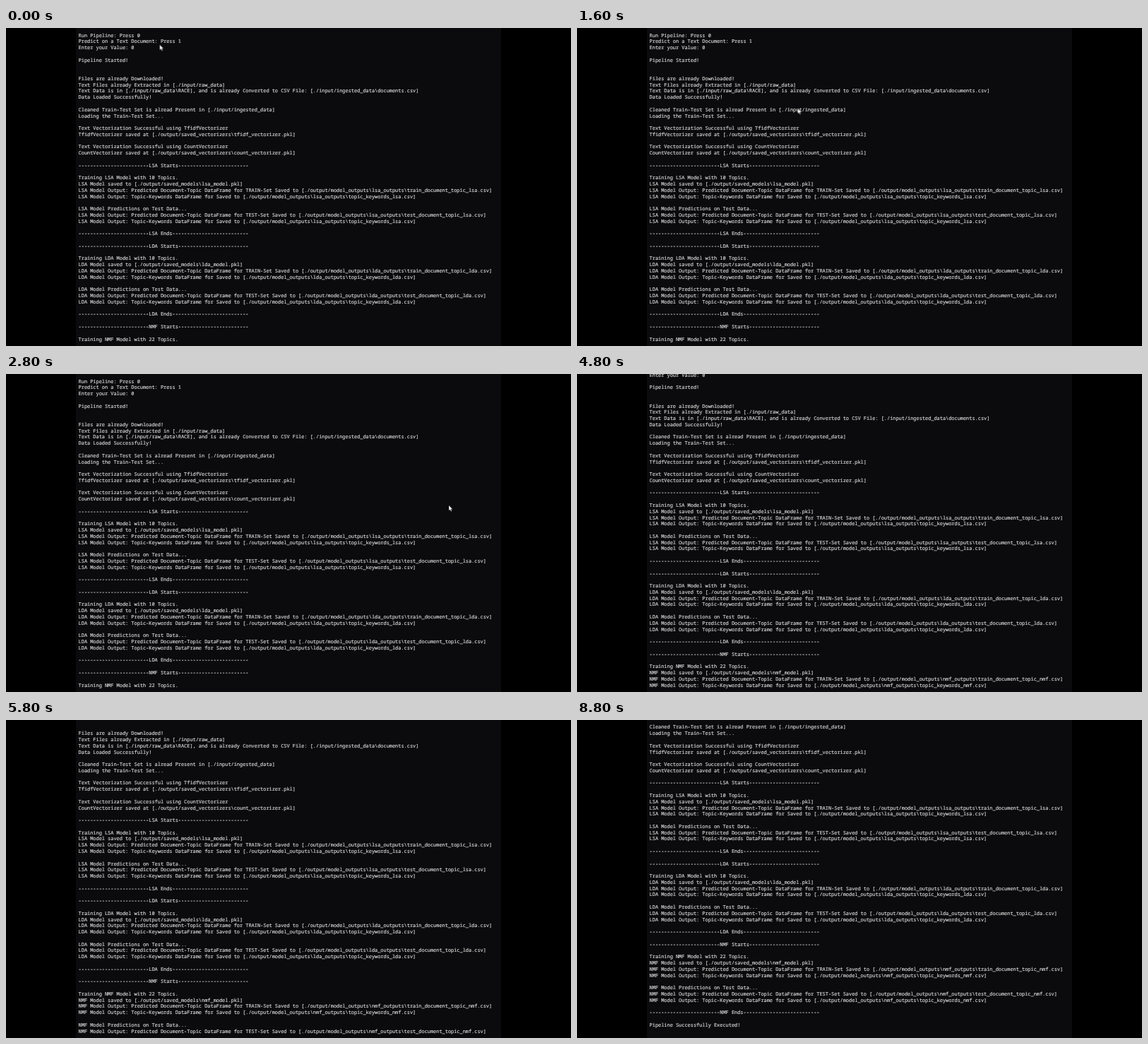
An HTML page that plays this animation: 800x450 px, repeating every 9 s.

```html
<!DOCTYPE html>
<html lang="en">
<head>
<meta charset="utf-8">
<title>Topic model pipeline</title>
<style>
  html, body { margin: 0; width: 100%; height: 100%; overflow: hidden; background: #000; }
  svg { display: block; width: 800px; height: 450px; --row: 8.776px; }
  text {
    font: 6.938px "Noto Sans Mono", "DejaVu Sans Mono", monospace;
    fill: #d0d0d0;
    stroke: #d0d0d0;
    stroke-width: .2px;
    text-rendering: geometricPrecision;
  }
  #log { animation: scroll 9s step-end infinite; }
  #pointer { offset-rotate: 0deg; animation: point 9s step-end infinite; }

  /* the log moves up by whole rows */
  @keyframes scroll {
    0% { transform: translateY(0); }
    53.333% { transform: translateY(calc(-3 * var(--row))); }
    64.444% { transform: translateY(calc(-6 * var(--row))); }
    82.222% { transform: translateY(calc(-9 * var(--row))); }
    97.777%, 100% { transform: translateY(calc(-12 * var(--row))); }
  }

  /* a sweep down and back, a rest, a jump right, a short drift, then hidden */
  @keyframes point {
    0% {
      offset-path: path("M217.6 23.6 C200 120 130 290 146 335 S240 380 290 250 S345 120 304.5 113.2");
      offset-distance: 0%;
      opacity: 1;
    }
    2.222% {
      offset-path: path("M217.6 23.6 C200 120 130 290 146 335 S240 380 290 250 S345 120 304.5 113.2");
      offset-distance: 0%;
      animation-timing-function: steps(10, end);
    }
    13.333% {
      offset-path: path("M217.6 23.6 C200 120 130 290 146 335 S240 380 290 250 S345 120 304.5 113.2");
      offset-distance: 100%;
    }
    14.444% { offset-path: path("M312.5 113.6 H313"); offset-distance: 0%; }
    31.111% { offset-path: path("M627 185.8 L686 216.5"); offset-distance: 0%; }
    35.555% {
      offset-path: path("M627 185.8 L686 216.5");
      offset-distance: 0%;
      animation-timing-function: steps(6, end);
    }
    42.222% { offset-path: path("M627 185.8 L686 216.5"); offset-distance: 100%; opacity: 1; }
    43.333%, 100% {
      offset-path: path("M627 185.8 L686 216.5");
      offset-distance: 100%;
      opacity: 0;
    }
  }
</style>
</head>
<body>
<svg viewBox="0 0 800 450">
  <clipPath id="view"><rect x="99" width="602" height="445"/></clipPath>
  <rect width="800" height="450" fill="#000"/>
  <rect x="99" width="602" height="450" fill="#0b0a0c"/>
  <g clip-path="url(#view)"><g id="log"></g></g>
  <path id="pointer" d="M0 0V7.6L1.8 6L3 8.7L4.3 8.1L3.1 5.5H5.5Z"
        fill="#fff" stroke="#111" stroke-width=".4"/>
</svg>
<script>
  const LEFT = 102.6, BASE = 12.5, ROW = 8.776;

  const dashes = n => '-'.repeat(n);

  function modelLog(name, topics) {
    const id = name.toLowerCase();
    const dir = `./output/model_outputs\\${id}_outputs\\`;
    const docs = set => `${name} Model Output: Predicted Document-Topic DataFrame for ` +
      `${set.toUpperCase()}-Set Saved to [${dir}${set}_document_topic_${id}.csv]`;
    const keywords = `${name} Model Output: Topic-Keywords DataFrame for Saved to ` +
      `[${dir}topic_keywords_${id}.csv]`;
    return [
      `${dashes(24)}${name} Starts${dashes(24)}`,
      '',
      `Training ${name} Model with ${topics} Topics.`,
      `${name} Model saved to [./output/saved_models\\${id}_model.pkl]`,
      docs('train'),
      keywords,
      '',
      `${name} Model Predictions on Test Data...`,
      docs('test'),
      keywords,
      '',
      `${dashes(24)}${name} Ends${dashes(26)}`,
      ''
    ];
  }

  const vectorLog = (name, file) => [
    `Text Vectorization Successful using ${name}`,
    `${name} saved at [./output/saved_vectorizers\\${file}_vectorizer.pkl]`,
    ''
  ];

  const lines = [
    'Run Pipeline: Press 0',
    'Predict on a Text Document: Press 1',
    'Enter your Value: 0',
    '',
    'Pipeline Started!',
    '',
    '',
    'Files are already Downloaded!',
    'Text Files already Extracted in [./input/raw_data]',
    'Text Data is in [./input/raw_data\\RACE], and is already Converted to CSV File: ' +
      '[./input/ingested_data\\documents.csv]',
    'Data Loaded Successfully!',
    '',
    'Cleaned Train-Test Set is alread Present in [./input/ingested_data]',
    'Loading the Train-Test Set...',
    '',
    ...vectorLog('TfidfVectorizer', 'tfidf'),
    ...vectorLog('CountVectorizer', 'count'),
    ...modelLog('LSA', 10),
    ...modelLog('LDA', 10),
    ...modelLog('NMF', 22),
    'Pipeline Successfully Executed!'
  ];

  const log = document.getElementById('log');
  lines.forEach((line, i) => {
    if (!line) return;
    const text = document.createElementNS('http://www.w3.org/2000/svg', 'text');
    text.setAttribute('x', LEFT);
    text.setAttribute('y', (BASE + i * ROW).toFixed(2));
    text.textContent = line;
    log.append(text);
  });
</script>
</body>
</html>
```
